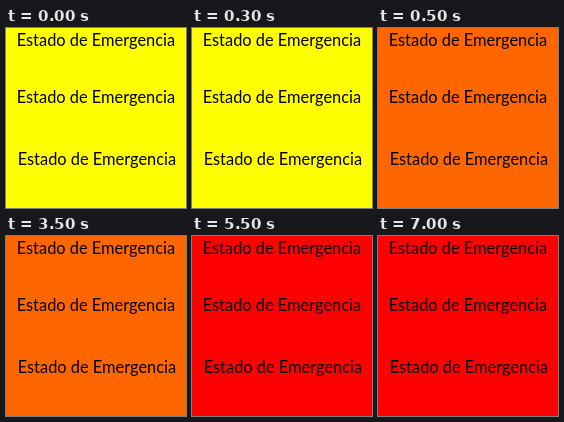
These frames come from a looping animation (180x180 px, 8 s). An HTML page:

```html
<!DOCTYPE html>
<html lang="es">
<head>
<meta charset="utf-8">
<title>Estado de Emergencia</title>
<style>
  html, body { margin: 0; width: 100%; height: 100%; overflow: hidden; background: #ff0; }
  svg { display: block; width: 100vw; height: 100vh; }
  text { font: 16.4px Lato, sans-serif; fill: #000; }
</style>
</head>
<body>
<svg viewBox="0 0 180 180">
  <rect id="alert" width="180" height="180" fill="#ff0"/>
  <text x="10.7" y="18">Estado de Emergencia</text>
  <text x="10.7" y="75">Estado de Emergencia</text>
  <text x="11.7" y="137">Estado de Emergencia</text>
</svg>
<script>
  const LOOP = 8000;
  const levels = [
    { until: 500, color: '#ff0' },
    { until: 5500, color: '#f60' },
    { until: LOOP, color: '#f00' },
  ];
  const background = document.getElementById('alert');
  const start = performance.now();

  function draw() {
    const time = (performance.now() - start) % LOOP;
    background.setAttribute('fill', levels.find(level => time < level.until).color);
    requestAnimationFrame(draw);
  }
  draw();
</script>
</body>
</html>
```
